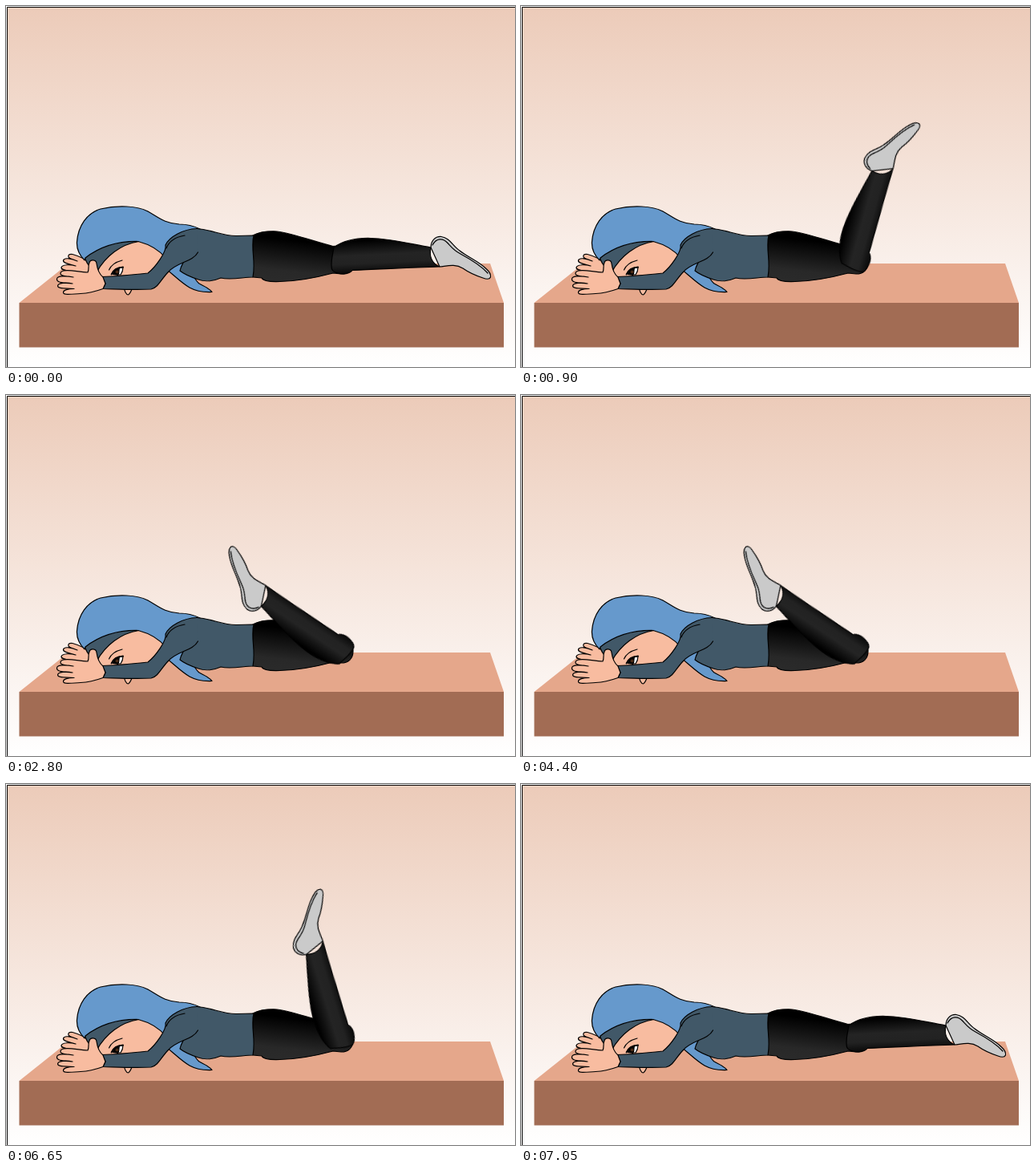
Animation, 635 px wide and 450 px high, one loop 7550 ms. Source, as an HTML page without scripts:

```html
<!DOCTYPE html>
<html lang="en">
<head>
<meta charset="utf-8">
<title>Prone knee bend</title>
<style>
html, body { margin: 0; width: 100%; height: 100%; overflow: hidden; background: #fff; }
svg { display: block; width: 635px; height: 450px; }
.ink { stroke: #000; stroke-width: 1.2; stroke-linejoin: round; stroke-linecap: round; }
.line { fill: none; }
.bold { stroke-width: 1.8; }
.skin { fill: #f8bca0; }
.scarf { fill: #6699cc; }
.shirt { fill: #415868; }
.shoe { fill: #cacaca; }

/* The shin turns about the knee in hard 50 ms steps. */
.shin { transform-origin: 418px 317px; animation: bend 7550ms -5ms infinite; }
@keyframes bend {
  0% { transform: rotate(0deg); }
  7.947% { transform: rotate(0deg); animation-timing-function: steps(12, end); }
  15.894% { transform: rotate(-143.5deg); }
  86.093% { transform: rotate(-143.5deg); animation-timing-function: steps(11, end); }
  93.377%, 100% { transform: rotate(0deg); }
}
.lid { visibility: hidden; animation: blink 7550ms -5ms step-end infinite; }
@keyframes blink {
  0%, 21.192%, 54.305%, 100% { visibility: hidden; }
  19.205%, 51.656% { visibility: visible; }
}
</style>
</head>
<body>
<svg viewBox="0 0 635 450" xmlns="http://www.w3.org/2000/svg">
  <defs>
    <linearGradient id="wall" x2="0" y2="1">
      <stop stop-color="#eccbb9"/>
      <stop offset="1" stop-color="#fff"/>
    </linearGradient>
    <linearGradient id="thigh" gradientUnits="userSpaceOnUse" x1="365" y1="284" x2="358" y2="343">
      <stop offset=".15" stop-color="#000"/>
      <stop offset=".8" stop-color="#282828"/>
      <stop offset="1" stop-color="#2a2a2a"/>
    </linearGradient>
    <linearGradient id="calf" gradientUnits="userSpaceOnUse" x1="470" y1="289" x2="472" y2="330">
      <stop offset=".05" stop-color="#000"/>
      <stop offset=".5" stop-color="#242424"/>
      <stop offset=".75" stop-color="#222"/>
      <stop offset="1" stop-color="#0c0c0c"/>
    </linearGradient>
  </defs>

  <rect x="1" y="1" width="634" height="449" fill="url(#wall)"/>
  <path d="M1.5 450V1.5H635" fill="none" stroke="#000"/>

  <!-- bench -->
  <path d="M78 321H604L621 370H16.500Z" fill="#e5a78b"/>
  <path d="M16.500 370H621V425.500H16.500Z" fill="#a26c54"/>

  <!-- scarf tail and back hand -->
  <path class="ink scarf" d="M200 328C211 337 220 346 229 351C238 356 247 357 257 356.500C253 351 246 349 241 346C236 342 234 336 229 330L224 310Z"/>
  <path class="ink skin" d="M108 334L103 321C100 315 92 312 83 309.500C77 308.500 76 313 81 315L89 318C82 315 73 313 71.500 317C71 321 79 321.500 87 324C80 322 70 322 69 326C68.500 330 79 330 90 333Z"/>

  <!-- head -->
  <path class="ink skin" d="M147.500 351C147.500 355 150 360 152.500 360C155 359 156 355 158 351Z"/>
  <path class="skin" d="M152 294L180 292L204 312L180 338H118L112 333C119 317 133 302 152 294Z"/>
  <path class="ink shirt" d="M98 314C114 299 137 292 166 293.500C143 297 124 312 113 332C108 330 102 323 98 314Z"/>
  <path class="ink scarf" d="M98 317C91 310 88 302 88.500 294C90 274 101 258 118 253C139 248 164 249 177 256C191 264 198 271 216 272C226 272 234 274 242 278L222 300L199 314C191 304 178 297 165 293.500C139 293 117 300 99 314Z"/>
  <path class="ink line" d="M128.500 329C131 323 137 319 145 317"/>
  <path class="ink" fill="#fff" d="M132 334C134 329 139 326 146 325.500C146 329 145 332 143 335Z"/>
  <path d="M133 335C133 329 137 326.500 142 327C141 331 142 333 140 336Z"/>
  <circle cx="138.500" cy="331.500" r="2" fill="#4a2a16"/>
  <path class="ink line bold" d="M131.500 334.500C134 328.500 139 326 146 325.500"/>
  <g class="lid">
    <path class="skin" d="M130.500 336C131 328 138 324 147.500 324.500V336Z"/>
    <path class="ink line" d="M132 335C138 335 143 332 146 328"/>
  </g>

  <!-- thigh and knee -->
  <path class="ink" fill="url(#thigh)" d="M308 286C317 281 326 280.500 338 281C360 284 385 294 408 299.500C421 299 433 306 433 319C433 329 427 334 418 334L408 333C389 338 366 343 342 343.500C330 344 321 343 319 339L308 338Z"/>

  <!-- torso and arm -->
  <path class="ink shirt" d="M238 277.500C258 279 270 287 288 286.500L309 286C305 302 312 318 308 338C296 338 281 342 268 339C259 343 248 344 240 341C231 338 223 335 217 330C218 325 220 322 222 318"/>
  <path class="ink shirt" d="M238 277.500C221 278 203 288 199 298C201 306 186 326 177 333C158 335 139 337 120 337.500L124 346L121 352.500C141 353 161 354 181 353C190 351 193 341 203 331C214 319 233 319 239.500 307"/>
  <path class="ink line" d="M223 286C211 288 203 294 200 302"/>

  <!-- front hand -->
  <path class="ink skin" d="M121 338C116 334 114 328 113 321C112.500 316 105 315.500 104 320C102 324 104 328 102 332C91 332 80 328 72 330C66 331.500 67 336 73 336.500L84 338C76 336.500 64 336 63.500 340C63 345 70 345 83 346C75 344.500 65 345 64.500 349C65 353 74 351.500 85 352.500C78 352.500 71 354 71.500 357.500C73 361 83 359 93 358.500C104 358 114 355 121 352.500L124 346Z"/>

  <!-- shin and foot -->
  <g class="shin">
    <path class="ink shoe" d="M530 301C530 293 535 287 543 287.500C554 289 557 299 566 305C576 313 591 319 599 327.500C603 331 605 335 604.500 338C603 341.500 599 340.500 595 339C586 336 577 332 570 327C560 321 551 324 541 325Z"/>
    <path class="ink line" d="M532 298C537 289 545 289 551 295.500C556 301 559 305 567 309C580 316 592 323 601 333"/>
    <path class="ink" fill="url(#calf)" d="M409 301C420 293 436 289 455 289.500C480 290 506 297 530 301C528 310 530 320 541 325C505 326 470 328 432 329.500C429 334 420 335 414 333C406 331 406 328 406 322C406 314 408 308 409 301Z"/>
  </g>
</svg>
</body>
</html>
```
